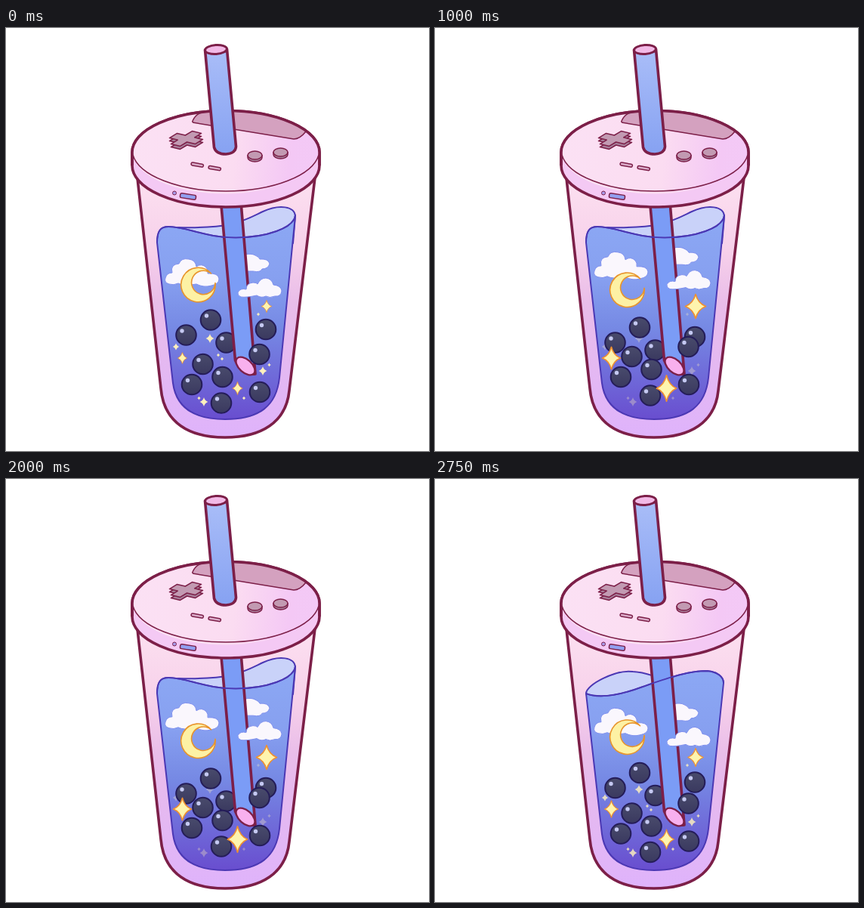
Write an HTML page that moves like this. It is 560x560 px and loops after 3000 ms.

```html
<!DOCTYPE html>
<html lang="en">
<head>
<meta charset="utf-8">
<title>Night sky bubble tea</title>
<style>
  html, body { margin: 0; width: 100%; height: 100%; overflow: hidden; background: #fff; }
  svg { display: block; width: 100vw; height: 100vh; }
  .edge { stroke: #7c1f48; stroke-width: 3.6; stroke-linejoin: round; }
  .fine { stroke: #7c1f48; stroke-width: 1.5; stroke-linejoin: round; }
  .water { stroke: #4b38b4; stroke-width: 2; stroke-linejoin: round; }
  .cloud { fill: #faf7fd; stroke: #7f90ee; stroke-width: 1; }
</style>
</head>
<body>
<svg viewBox="0 0 560 560" fill="none">
  <defs>
    <linearGradient id="cup" x1="0" y1="200" x2="0" y2="540" gradientUnits="userSpaceOnUse">
      <stop offset="0" stop-color="#fce0f0"/>
      <stop offset=".28" stop-color="#f7d0ea"/>
      <stop offset=".48" stop-color="#e9bde9"/>
      <stop offset="1" stop-color="#dfb3fb"/>
    </linearGradient>
    <linearGradient id="tea" x1="0" y1="250" x2="0" y2="518" gradientUnits="userSpaceOnUse">
      <stop offset="0" stop-color="#8ca8f4"/>
      <stop offset=".3" stop-color="#87a0f0"/>
      <stop offset=".55" stop-color="#7689e4"/>
      <stop offset="1" stop-color="#694ecf"/>
    </linearGradient>
    <linearGradient id="lid" x1="167" y1="150" x2="415" y2="175" gradientUnits="userSpaceOnUse">
      <stop offset="0" stop-color="#fbe1f4"/>
      <stop offset=".55" stop-color="#fbdcf1"/>
      <stop offset=".85" stop-color="#f4c8f5"/>
      <stop offset="1" stop-color="#f3c9f6"/>
    </linearGradient>
    <linearGradient id="tube" x1="0" y1="30" x2="0" y2="160" gradientUnits="userSpaceOnUse">
      <stop offset="0" stop-color="#a9bdf8"/>
      <stop offset="1" stop-color="#88a3f2"/>
    </linearGradient>
    <linearGradient id="pearl" x1="0" y1="0" x2="0" y2="1">
      <stop offset="0" stop-color="#494b6c"/>
      <stop offset="1" stop-color="#3a395f"/>
    </linearGradient>
    <clipPath id="lidTop"><ellipse cx="291" cy="164.5" rx="124" ry="55"/></clipPath>
  </defs>

  <path class="edge" fill="url(#cup)" d="M173 190 L205 477 C209 523 243 542 290 542 C338 542 371 522 375 480 L410 190Z"/>

  <path id="back" class="water" fill="#c9d2f9"/>
  <path id="body" class="water" fill="url(#tea)"/>
  <path class="cloud" data-drift="-2.2" d="M316 300Q325 298 330 301Q335 303 336 306Q347 305 349 312Q347 319 339 319Q337 324 327 322L314 322Z"/>
  <path class="cloud" data-drift="-2.3" d="M216 339Q209 337 211 331Q213 324 220 324Q217 313 229 312Q232 304 242 306Q251 307 252 316Q259 311 265 317Q268 320 267 325Q281 324 282 332Q282 339 272 341Q262 344 252 339Q235 342 228 338Q222 341 216 339Z"/>
  <path data-drift="1.7" fill="#fdf1a4" stroke="#e8942c" stroke-width="1.6" stroke-linejoin="round" d="M271.5 325A22.7 22.7 0 1 0 277 337.5A15.7 15.7 0 1 1 271.5 325Z"/>
  <g id="glints"></g>
  <g id="rear"></g>

  <path class="edge" fill="#7b9cf6" d="M284.500 230L303.500 440Q313 460 330 458L311 230Z"/>
  <ellipse class="edge" style="stroke-width:2.4" fill="#f8b0ee" cx="317" cy="447.500" rx="15" ry="8.500" transform="rotate(42 317 447.500)"/>
  <path id="front" class="water" style="stroke-width:1.8"/>

  <path class="cloud" data-drift="-2.6" d="M311 356Q306 354 307 350Q310 344 318 346Q318 338 327 337Q332 337 333 339Q337 331 344 331Q352 332 354 340Q364 341 365 348Q364 356 356 355Q349 358 344 355Q338 358 332 354Q318 357 311 356Z"/>
  <g id="pearls"></g>
  <g id="stars"></g>

  <path class="edge" fill="#f4c9f4" d="M167 164.500A124 55 0 0 1 415 164.500V182A124 55 0 0 1 167 182Z"/>
  <ellipse fill="url(#lid)" cx="291" cy="164.500" rx="123" ry="55"/>
  <path clip-path="url(#lidTop)" class="fine" fill="#d4a1bf" d="M247 123Q251 114 259 112L265 100H400L397 137Q389 147 381 147L250 125.500Q246 125 247 123Z"/>
  <path class="fine" d="M168 168A124 55 0 0 0 414 168"/>
  <path class="edge" d="M167 182V164.500A124 55 0 0 1 415 164.500V182"/>

  <g class="fine" fill="#c29ab2">
    <path id="padSide" fill="#a87f9a"/>
    <path id="padTop"/>
    <g id="buttons"></g>
    <rect x="245" y="179" width="16.500" height="4" rx="2" transform="rotate(10 253 181)" fill="#dcaecb"/>
    <rect x="268" y="183.500" width="16.500" height="4" rx="2" transform="rotate(10 276 185.500)" fill="#dcaecb"/>
    <rect x="230.500" y="220" width="21" height="6" rx="2" transform="rotate(9 241 223)" fill="#929ff0"/>
    <circle cx="223" cy="218.500" r="2.500" stroke-width="1" fill="#a99cec"/>
  </g>

  <path class="edge" fill="url(#tube)" d="M263.500 29L275.500 158Q278 167 291 167Q304 166 304.500 157L292.500 28Z"/>
  <ellipse class="edge" style="stroke-width:3" fill="#f2b9e6" cx="278" cy="28.500" rx="14.500" ry="6" transform="rotate(-4 278 28.500)"/>
</svg>

<script>
const STEP = 250, STEPS = 12;
const $ = id => document.getElementById(id);

function add(parent, tag, attrs) {
  const node = document.createElementNS('http://www.w3.org/2000/svg', tag);
  for (const key in attrs) node.setAttribute(key, attrs[key]);
  return parent.appendChild(node);
}

// Rises from 0 to half the period, then falls back.
const triangle = (step, period) => {
  const phase = step % period;
  return Math.min(phase, period - phase);
};

const starPath = (w, h) => {
  const a = w * .24, b = h * .24;
  return `M0 ${-h}Q${a} ${-b} ${w} 0Q${a} ${b} 0 ${h}Q${-a} ${b} ${-w} 0Q${-a} ${-b} 0 ${-h}Z`;
};

// Front surface, back surface and the closing edge hidden behind the tea.
const waves = [
  ['M200 284C200 268 205 263 215 263C240 263 265 278 305 277.5C345 277 381 265 383 248',
   'M228 264C300 266 315 255 340 243C362 233 382 236 383 249', 'L380 285L245 285Z'],
  ['M199.5 279C199 262 204 258 214 258C245 258 270 286 315 285.5C345 285 383 268 383 252',
   'M253 272C310 274 330 260 350 250C366 242 381 243 383 252', 'L380 292L270 292Z'],
  ['M200 278C208 284 225 288 250 288C285 288 325 275 345 261C365 246 382 244 383 258',
   'M200 278C198 262 205 258 215 258C240 258 260 274 330 269', 'L320 295L204 295Z'],
  ['M200 284C215 290 240 288 275 275C310 263 335 254 360 254C374 255 382 262 382 270',
   'M200 284C200 272 240 252 262 255C285 256 295 266 312 264', 'L300 295L204 295Z']
];
const vessel = 'L362 463C358 500 336 518 290 518C245 518 225 500 221 470Z';

function pearl(parent, x, y, drift) {
  const g = add(parent, 'g', { 'data-drift': drift });
  add(g, 'circle', { cx: x, cy: y, r: 13.3, fill: 'url(#pearl)', stroke: '#241c58', 'stroke-width': 2 });
  add(g, 'circle', { cx: x - 5.5, cy: y - 5.5, r: 2.7, fill: '#c5c9f2' });
}

pearl($('rear'), 291.5, 416.5, 2.5);
for (const [x, y, drift] of [
  [271, 386.5, 2.5], [238.5, 406.5, 2.5], [344, 399, 2.5],
  [335.5, 432, -2.5], [260.500, 445, -2.5], [286.5, 462, -2.5],
  [246, 472, -2.5], [336, 482, -2.5], [285, 496.5, -2.5]
]) pearl($('pearls'), x, y, drift);

for (const [x, y, size] of [
  [270, 411, 6], [225, 422, 4.5], [281, 433, 2.5], [286, 438, 2.5], [340, 454, 6],
  [348.5, 446, 2.5], [262, 495, 6], [255.5, 490, 2.5], [315, 490, 2.5], [334, 379, 2.5]
]) add($('glints'), 'path', {
  d: starPath(size * .9, size), transform: `translate(${x} ${y})`, fill: '#fdf0bd'
});

const stars = [[345, 368.5, 17, 20], [233.5, 437, 15, 18.5], [306.5, 477, 16.5, 21.5]].map(([x, y, w, h]) => ({
  x, y,
  node: add($('stars'), 'path', {
    d: starPath(w, h), fill: '#fef4ae', stroke: '#ef9030', 'stroke-width': 2, 'stroke-linejoin': 'round'
  })
}));

// Directional pad: two skewed arms crossing at the centre.
const arm = .36;
const pad = [[1, arm], [1, -arm], [arm, -arm], [arm, -1], [-arm, -1], [-arm, -arm],
  [-1, -arm], [-1, arm], [-arm, arm], [-arm, 1], [arm, 1], [arm, arm]];
const padPath = cy => 'M' + pad.map(([u, v]) => [238.5 + 14 * u + 17 * v, cy - 8.5 * u + 4 * v]).join('L') + 'Z';
$('padTop').setAttribute('d', padPath(146.5));
$('padSide').setAttribute('d', padPath(150.5));

for (const [x, y] of [[329.5, 168.5], [363.5, 164.5]]) {
  add($('buttons'), 'path', {
    d: `M${x - 9.5} ${y}v3a9.500 5.500 0 0 0 19 0v-3Z`, fill: '#a87f9a'
  });
  add($('buttons'), 'ellipse', { cx: x, cy: y, rx: 9.5, ry: 5.5 });
}

const drifters = [...document.querySelectorAll('[data-drift]')];
let shown = -1;

function draw() {
  const step = Math.floor(performance.now() / STEP) % STEPS;
  if (step !== shown) {
    shown = step;
    const drift = triangle(step, STEPS);
    const [front, back, closing] = waves[step % waves.length];
    $('front').setAttribute('d', front);
    $('back').setAttribute('d', back + closing);
    $('body').setAttribute('d', front + vessel);
    for (const node of drifters) node.setAttribute('transform', `translate(0 ${node.dataset.drift * drift})`);
    $('glints').setAttribute('opacity', 1 - drift / 6);
    const scale = .4 + .2 * triangle(step, 6);
    for (const { x, y, node } of stars) node.setAttribute('transform', `translate(${x} ${y}) scale(${scale})`);
  }
  requestAnimationFrame(draw);
}
draw();
</script>
</body>
</html>
```
